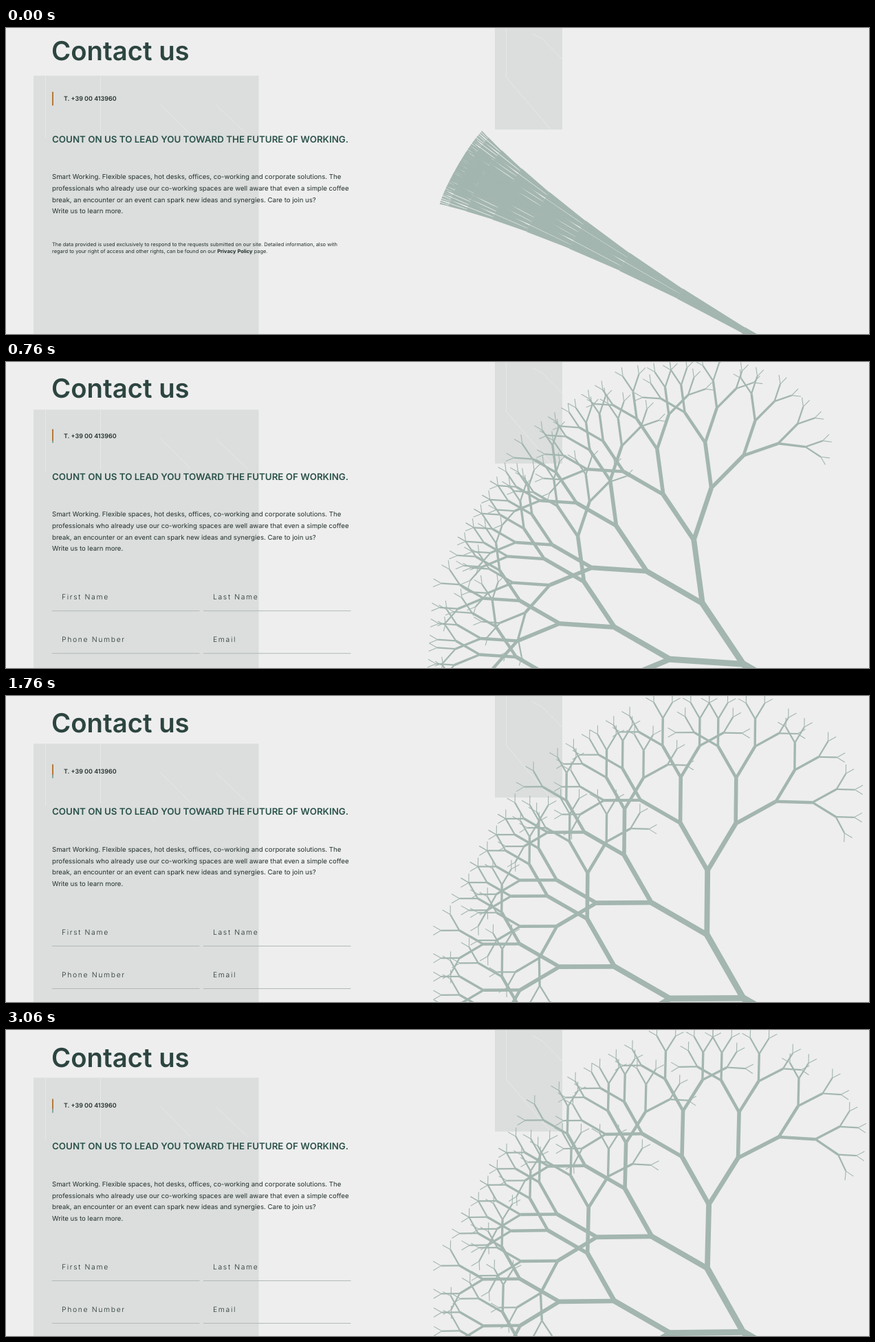
Write an HTML page with a canvas that moves like this. It is 1255 px wide and 446 px high and loops after 3140 ms.

```html
<!DOCTYPE html>
<html lang="en">
<head>
<meta charset="utf-8">
<title>Contact us</title>
<style>
  html, body { margin: 0; width: 100%; height: 100%; overflow: hidden; background: #eee; }
  svg, canvas { position: absolute; left: 0; top: 0; width: 1255px; height: 446px; }
  text { font-family: Inter, "Open Sans", sans-serif; text-rendering: geometricPrecision; fill: #22302c; }
  .title { font-size: 38.3px; font-weight: 600; fill: #2d4540; }
  .phone { font-size: 8.95px; font-weight: 600; }
  .lead { font-size: 13.35px; font-weight: 600; fill: #2a5149; }
  .body { font-size: 9.63px; }
  .note { font-size: 7.48px; }
  .note tspan { font-weight: 700; }
  .label { font-size: 10.4px; font-weight: 300; letter-spacing: 1.65px; fill: #4d5a56; }
</style>
</head>
<body>
<svg viewBox="0 0 1255 446">
  <path fill="#dbdedd" d="M40 69.5H367.500V446H40ZM711 0H809V148H711Z"/>
  <path fill="none" stroke="#fff" stroke-opacity=".3"
    d="M57.500 70V160M137.500 70V157M225 112L268 155M305 112L352 156M727.500 0V72L792 148M765 8L780 16L809 46"/>
  <g id="page">
    <text class="title" x="66" y="46.700">Contact us</text>
    <text class="phone" x="84" y="105.800">T. +39 00 413960</text>
    <text class="lead" x="67" y="166.700">COUNT ON US TO LEAD YOU TOWARD THE FUTURE OF WORKING.</text>
    <g class="body">
      <text x="67" y="220.200">Smart Working. Flexible spaces, hot desks, offices, co-working and corporate solutions. The</text>
      <text x="67" y="237">professionals who already use our co-working spaces are well aware that even a simple coffee</text>
      <text x="67" y="253.700">break, an encounter or an event can spark new ideas and synergies. Care to join us?</text>
      <text x="67" y="270.400">Write us to learn more.</text>
    </g>
    <g class="note" id="note">
      <text x="67" y="317.600">The data provided is used exclusively to respond to the requests submitted on our site. Detailed information, also with</text>
      <text x="67" y="328.100">regard to your right of access and other rights, can be found on our <tspan>Privacy Policy</tspan> page.</text>
    </g>
    <g id="form">
      <g class="label">
        <text x="81" y="341">First Name</text>
        <text x="301" y="341">Last Name</text>
        <text x="81" y="403">Phone Number</text>
        <text x="301" y="403">Email</text>
      </g>
      <path stroke="#b2b9b6" d="M67 357.800H281.500M287 357.800H501.500M67 419.800H281.500M287 419.800H501.500"/>
    </g>
  </g>
  <rect id="tail" x="67" width="2" height="20" fill="#86a59d"/>
  <rect id="bar" x="67" width="2" fill="#b5783a"/>
  <rect id="edge" x="1253.500" y="18.500" width="6" height="11" fill="none" stroke="#55b578"/>
</svg>
<canvas id="tree" width="1255" height="446"></canvas>
<script>
const LOOP = 3140, STEP = 76.6, LAST = 40;
const UNIT = 13.32, DEPTH = 9, LEAN = -60 * Math.PI / 180;
const $ = id => document.getElementById(id);
const ctx = $('tree').getContext('2d');
ctx.strokeStyle = '#a3b6af';

function branch(x, y, angle, spread, depth) {
  if (!depth) return;
  const x2 = x + Math.sin(angle) * depth * UNIT;
  const y2 = y - Math.cos(angle) * depth * UNIT;
  ctx.lineWidth = depth * 1.12;
  ctx.beginPath();
  ctx.moveTo(x, y);
  ctx.lineTo(x2, y2);
  ctx.stroke();
  branch(x2, y2, angle - spread, spread, depth - 1);
  branch(x2, y2, angle + spread, spread, depth - 1);
}

function show(id, on) {
  $(id).style.display = on ? '' : 'none';
}

function draw(ms) {
  const step = Math.min(LAST, Math.floor((ms + 10) / STEP));
  const t = step * STEP / 1000;

  // The page slides down while the tree opens towards its final spread
  const drop = 9.4 * t / (t + 0.7);
  const spread = 30.7 - 28.5 * Math.exp(-2.4 * t);

  $('page').setAttribute('transform', `translate(0 ${drop.toFixed(2)})`);
  show('note', step === 0);
  show('form', step > 0);
  show('edge', step >= 25 && step <= 31);

  const top = 93 + drop;
  $('tail').setAttribute('y', top);
  $('bar').setAttribute('y', top);
  $('bar').setAttribute('height', Math.min(20, 115 - top));

  ctx.clearRect(0, 0, 1255, 446);
  branch(1175.9, 500.3, LEAN, spread * Math.PI / 180, DEPTH);
}

const start = performance.now();
function tick(now) {
  draw(Math.max(0, now - start) % LOOP);
  requestAnimationFrame(tick);
}
draw(0);
requestAnimationFrame(tick);
</script>
</body>
</html>
```
